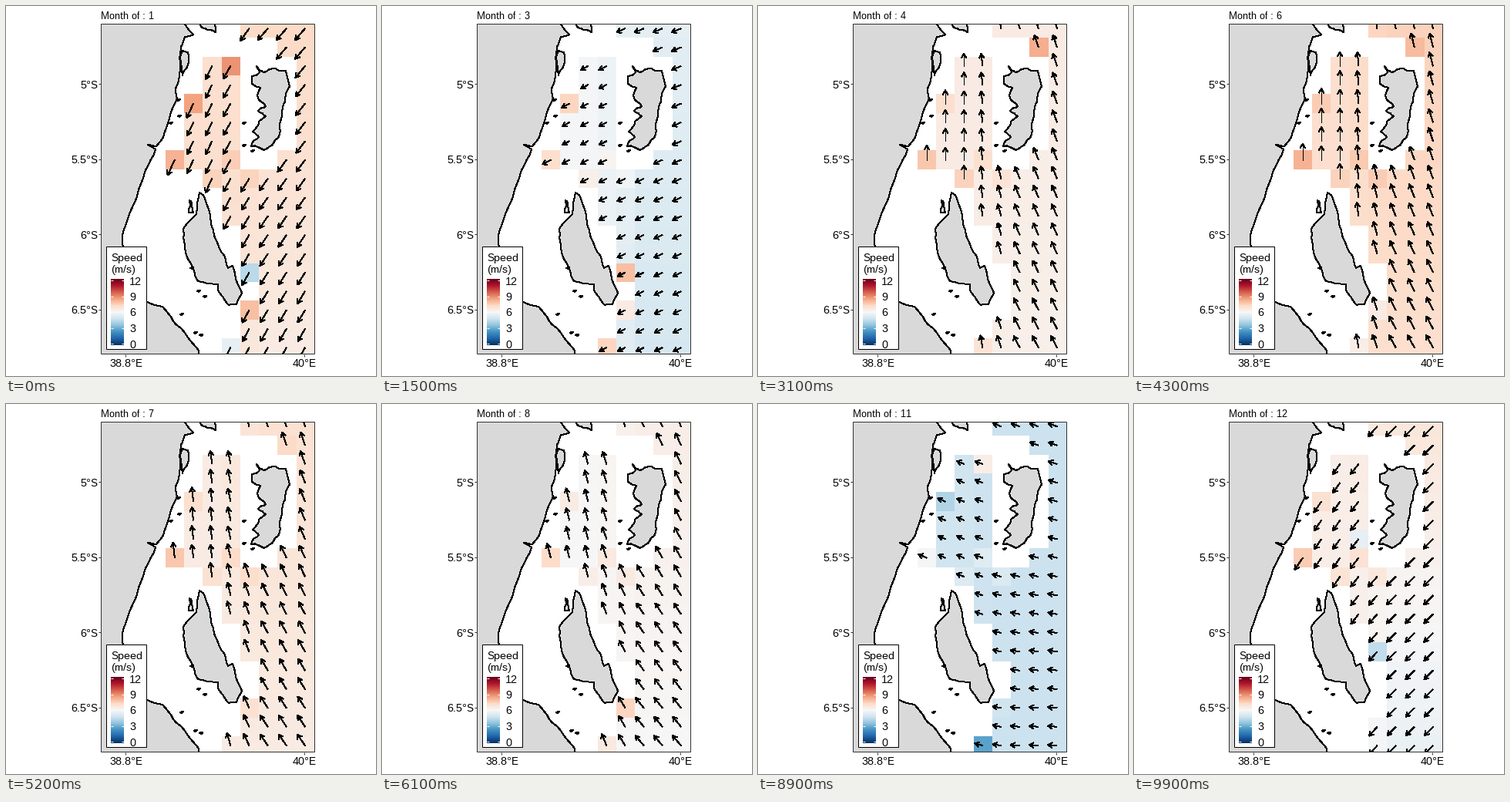
A matplotlib script for the animation above (10000 ms loop, 480 by 480 pixels).

```python
import numpy as np
import matplotlib.pyplot as plt
from matplotlib.animation import FuncAnimation
from matplotlib.collections import LineCollection
from matplotlib.patches import Polygon, Rectangle

plt.rcParams.update({"font.family": "Liberation Sans", "text.hinting": "native",
                     "text.hinting_factor": 1})
SIZE, FRAMES, ROWS, COLS = 480, 100, 18, 8
DX, DY, X0, Y0 = 24.15, 24.35, 218.9, 29.2
CMAP = plt.get_cmap("RdBu_r")
rng = np.random.default_rng(7)

# Columns at sea in each row of the grid
SEA = ["4567", "67", "237", "237", "1237", "1237", "1237", "012367", "234567",
       "34567", "34567", "4567", "4567", "567", "567", "567", "4567", "4567"]
CELLS = {(r, int(c)) for r, cols in enumerate(SEA) for c in cols}
# Headlands and straits where the wind is stronger than around them
EXPOSED = {(7, 0): 1.1, (4, 1): 0.5, (7, 3): 0.5, (8, 2): 0.4, (8, 4): 0.4}

v, u = np.mgrid[0:ROWS, 0:COLS].astype(float)
u, v = np.clip((u - 2) / 3, 0, 1), v / (ROWS - 1)
WEIGHTS = np.stack([1 - u, u * (1 - v), u * v], -1)


class Season:
    """Speed and wind vector in the west, north-east and south-east, plus local spots."""

    def __init__(self, frame, speed, wind, spots):
        self.frame = frame
        self.cells = CELLS | set(spots)
        self.speed = WEIGHTS @ np.array(speed)
        self.wind = WEIGHTS @ np.array(wind, float)
        for cell, boost in EXPOSED.items():
            self.speed[cell] += boost
            self.wind[cell] *= 1 + 0.15 * boost
        for cell, value in spots.items():
            self.speed[cell] = value


SEASONS = [
    Season(0, (7.0, 7.2, 6.5), [(-8, 17), (-13, 15), (-9, 16)],
           {(2, 3): 8.7, (4, 1): 8.4, (13, 4): 4.4, (15, 4): 7.8, (17, 3): 5.5}),
    Season(15, (5.9, 5.4, 5.0), [(-9, 5), (-12, 5), (-10, 5)],
           {(4, 1): 7.3, (13, 4): 7.8, (15, 4): 6.5, (17, 3): 7.3}),
    Season(31, (6.5, 6.5, 6.3), [(0, -16), (-5, -16), (-8, -15)],
           {(1, 6): 8.2, (8, 2): 7.4, (17, 3): 6.8}),
    Season(43, (7.0, 7.4, 7.0), [(0, -18), (-4, -18), (-9, -16)],
           {(1, 6): 7.9, (15, 4): 6.5, (17, 3): 6.4}),
    Season(61, (6.0, 6.4, 6.0), [(-4, -16), (-7, -16), (-11, -13)],
           {(15, 4): 7.3, (17, 3): 6.6}),
    Season(89, (4.8, 4.7, 4.7), [(-9, -4), (-11, -4), (-12, -1)],
           {(2, 3): 6.4, (4, 1): 4.2, (17, 3): 2.8, (15, 4): 4.8}),
    Season(99, (6.4, 6.7, 5.6), [(-9, 13), (-13, 13), (-11, 11)],
           {(12, 4): 4.5, (6, 3): 5.5}),
]

fig = plt.figure(figsize=(SIZE / 72, SIZE / 72), dpi=72, facecolor="white")
ax = fig.add_axes([0, 0, 1, 1])
ax.axis("off")
panel = Rectangle((123, 23), 277, 428, fill=False, ec="#333333", lw=1, zorder=6)
ax.add_patch(panel)


def label(x, y, text, size=14, **style):
    return ax.text(x, y, text, fontsize=size, color="black", zorder=9, **style)


def rule(xs, ys, color="#333333", zorder=6):
    ax.plot(xs, ys, color=color, lw=1, zorder=zorder, solid_capstyle="butt")


def roughen(points, amount, rounds=2):
    """Closed outline with randomly displaced midpoints."""
    p = np.array(points, float)
    for _ in range(rounds):
        step = np.roll(p, -1, 0) - p
        normal = np.column_stack([-step[:, 1], step[:, 0]])
        mid = p + step / 2 + normal * rng.uniform(-amount, amount, (len(p), 1))
        p = np.stack([p, mid], 1).reshape(-1, 2)
    return p


def land(points, amount=0.1):
    shape = Polygon(roughen(points, amount), closed=True, fc="#D9D9D9", ec="black",
                    lw=1, zorder=3, antialiased=False)
    ax.add_patch(shape)
    shape.set_clip_path(panel)


# Mainland, its bay in the north, and the islands
land([(110, 10), (228, 15), (235, 28), (243, 37), (232, 40), (227, 53), (226, 83),
      (220, 107), (222, 120), (212, 146), (204, 170), (195, 182), (184, 180),
      (194, 186), (181, 213), (164, 261), (153, 290), (152, 315), (160, 375),
      (183, 384), (203, 390), (217, 409), (234, 427), (250, 447), (249, 460),
      (110, 460)], 0.06)
land([(229, 58), (236, 60), (237, 69), (235, 79), (229, 90), (226, 68)])
land([(243, 15), (254, 28), (263, 31), (272, 34), (273, 15)])
land([(325, 78), (334, 86), (350, 81), (363, 84), (362, 124), (358, 142), (356, 162),
      (347, 178), (335, 187), (318, 182), (328, 170), (320, 163), (328, 150),
      (337, 143), (327, 136), (337, 130), (326, 116), (330, 106), (319, 101),
      (319, 91), (329, 86)], 0.14)
land([(251, 242), (257, 247), (265, 272), (270, 298), (284, 325), (288, 340),
      (294, 337), (306, 372), (299, 387), (289, 388), (275, 369), (275, 361),
      (249, 357), (243, 341), (232, 314), (230, 289), (247, 270)], 0.06)
land([(238, 252), (241, 255), (243, 268), (237, 268)])
for x, y in [(309, 152), (309, 181), (320, 188), (224, 122), (225, 143), (214, 152),
             (241, 340), (250, 370), (258, 377), (228, 400), (246, 424), (253, 427)]:
    land([(x - 2, y), (x, y - 1), (x + 2, y - 1), (x, y + 1)], 0.2)

tiles = ax.imshow(np.ones((ROWS, COLS, 4)), interpolation="nearest", zorder=2,
                  extent=(X0 - DX / 2, X0 + DX * (COLS - 0.5),
                          Y0 + DY * (ROWS - 0.5), Y0 - DY / 2))
tiles.set_clip_path(panel)
arrows = LineCollection([], colors="black", linewidths=1, zorder=5, antialiased=False)
ax.add_collection(arrows)
arrows.set_clip_path(panel)

# Axes
for k, name in enumerate(["5°S", "5.5°S", "6°S", "6.5°S"]):
    y = 101.4 + 97.4 * k
    rule([120, 123], [y, y])
    label(119, y + 5.5, name, ha="right")
for x, name in [(155, "38.8°E"), (387, "40°E")]:
    rule([x, x], [452, 455])
    label(x + 0.5, 468, name, ha="center")
title = label(123, 17, "", 13)

# Legend
ax.add_patch(Rectangle((130, 312), 52, 133, fc="white", ec="black", lw=1, zorder=7))
label(136, 331, "Speed")
label(136, 346, "(m/s)")
ax.imshow(np.linspace(1, 0, 86)[:, None], cmap=CMAP, zorder=8,
          extent=(136, 153, 440, 354))
for k in range(5):
    y = 438 - 20.5 * k
    rule([136, 139.4], [y, y], "white", 9)
    rule([149.6, 153], [y, y], "white", 9)
    label(160, y + 5.5, str(3 * k))

ax.set_aspect("auto")
ax.set_xlim(0, SIZE)
ax.set_ylim(SIZE, 0)


def arrow(tail, vec, head=6.5, spread=np.pi / 6):
    tip = tail + vec
    back = np.arctan2(-vec[1], -vec[0])
    a, b = (tip + head * np.array([np.cos(t), np.sin(t)])
            for t in (back - spread, back + spread))
    return [(tail, tip), (a, tip, b)]


def draw(i):
    p, q = next((a, b) for a, b in zip(SEASONS, SEASONS[1:]) if i <= b.frame)
    f = (i - p.frame) / (q.frame - p.frame)
    cells = (p if f < 0.5 else q).cells
    color = CMAP(((1 - f) * p.speed + f * q.speed) / 12)
    wind = (1 - f) * p.wind + f * q.wind

    rgba = np.zeros((ROWS, COLS, 4))
    lines = []
    for r, c in sorted(cells):
        rgba[r, c] = color[r, c]
        lines += arrow(np.array([X0 + c * DX, Y0 + r * DY]), wind[r, c])
    tiles.set_data(rgba)
    arrows.set_segments(lines)
    title.set_text(f"Month of : {round(1 + i * 11 / (FRAMES - 1))}")
    return tiles, arrows, title


anim = FuncAnimation(fig, draw, frames=FRAMES, interval=100, repeat=True,
                     repeat_delay=0, blit=False)
plt.show()
```
